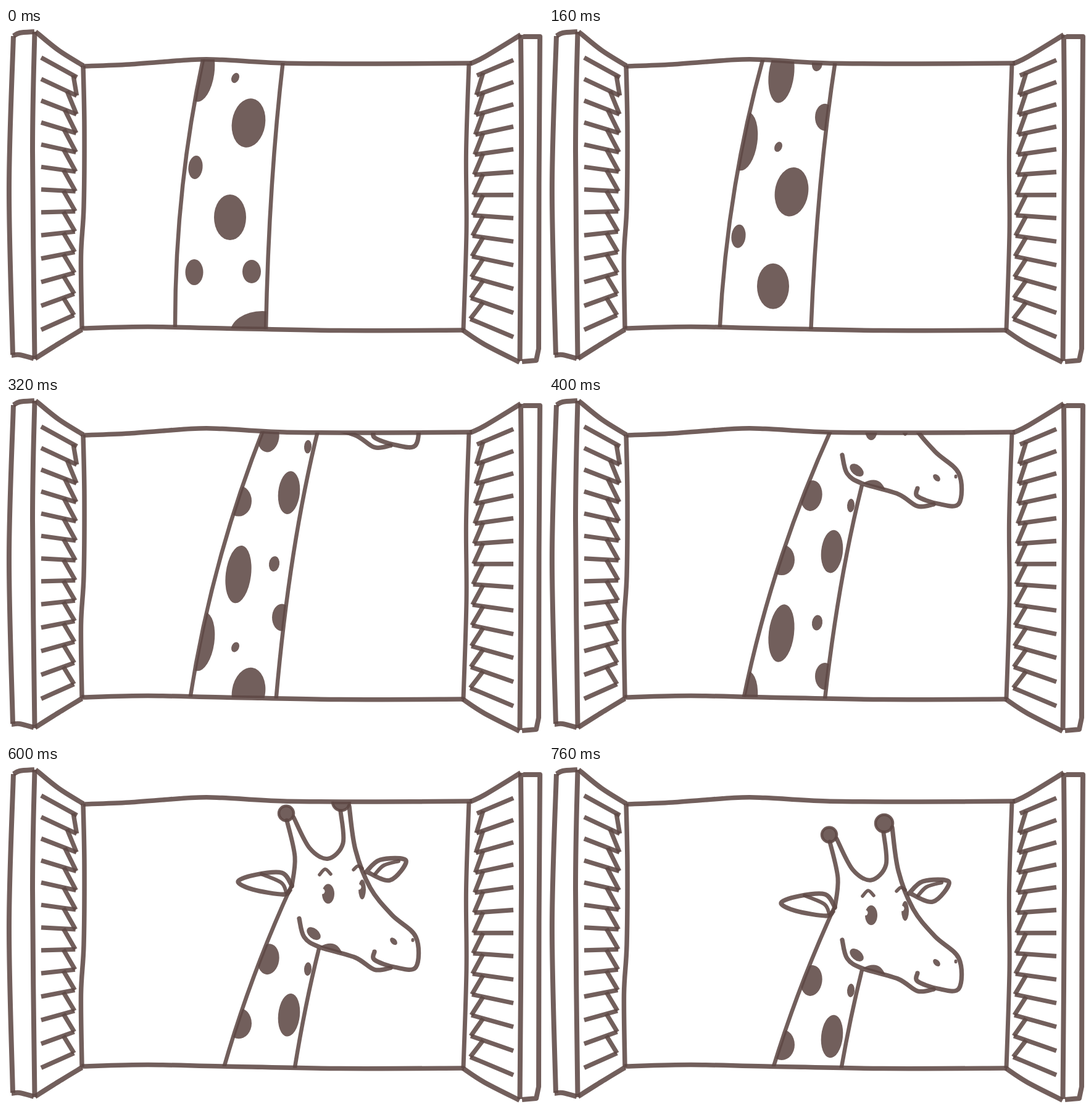
An HTML page that plays this animation: 870x553 px, repeating every 1720 ms.

```html
<!DOCTYPE html>
<html lang="en">
<head>
<meta charset="utf-8">
<title>Giraffe at the window</title>
<style>
html, body { margin: 0; width: 100%; height: 100%; overflow: hidden; background: #fff; }
svg { display: block; width: 100%; height: 100%; }
.line { fill: none; stroke: #5d4844; stroke-opacity: .87; stroke-linejoin: round; }
.spot { fill: #5d4844; fill-opacity: .87; }
.round { stroke-linecap: round; }
</style>
</head>
<body>
<svg viewBox="0 0 870 553">
  <defs>
    <clipPath id="view"><path id="opening"/></clipPath>
    <clipPath id="skin"><path d="M462,230Q272,645 274,1100H421Q430,640 507,331Z"/></clipPath>
  </defs>
  <g clip-path="url(#view)">
    <g id="giraffe">
      <g id="coat" clip-path="url(#skin)"></g>
      <g id="head"></g>
    </g>
  </g>
  <g id="frame"></g>
</svg>
<script>
const LOOP = 1720, MOVE = 760, STEP = 40, TRAVEL = 608;
const byId = id => document.getElementById(id);
const giraffe = byId('giraffe'), coat = byId('coat'), head = byId('head'), frame = byId('frame');

function add(parent, tag, attrs) {
  const el = document.createElementNS('http://www.w3.org/2000/svg', tag);
  for (const key in attrs) el.setAttribute(key, attrs[key]);
  parent.appendChild(el);
  return el;
}

// Smooth curve through a few key points (Catmull-Rom)
function curve(text) {
  const p = text.trim().split(/\s+/).map(s => s.split(',').map(Number));
  const at = i => p[Math.max(0, Math.min(p.length - 1, i))];
  let d = 'M' + p[0];
  for (let i = 0; i < p.length - 1; i++) {
    const [a, b, c, e] = [at(i - 1), at(i), at(i + 1), at(i + 2)];
    const c1 = b.map((v, k) => v + (c[k] - a[k]) / 6);
    const c2 = c.map((v, k) => v - (e[k] - b[k]) / 6);
    d += `C${c1} ${c2} ${c}`;
  }
  return d;
}

const path = (parent, width, d, cap = '') =>
  add(parent, 'path', { class: 'line ' + cap, 'stroke-width': width, d });
const bar = (text, width = 8) => path(frame, width, curve(text));
const ink = (text, width = 7.3) => path(head, width, curve(text), 'round');
const oval = (parent, cx, cy, rx, ry, turn = 0) => add(parent, 'ellipse',
  { class: 'spot', cx, cy, rx, ry, transform: `rotate(${turn} ${cx} ${cy})` });

// Window opening
const lintel = '125,62 200,59 300,51.5 350,51.5 450,57 600,58 755,57';
const sill = '742,490 540,490.5 350,487 230,484.5 122,487';
byId('opening').setAttribute('d', curve(lintel) + curve(sill).replace('M', 'L') + 'Z');
bar(lintel, 7.5);
bar(sill, 7.5);
bar('125,61 127,160 126,290 121.5,370 123,488', 7.5);
bar('750,58 745.5,200 746,330 741,490', 7);

// Left shutter
bar('12,13 5,260 11,530');
bar('12,13 22,8 46,6');
bar('46.5,6 43,200 46.5,537');
bar('9,531 22,530 45,536');
bar('48,6 85,36 125,61');
bar('47,536 85,512 123,489');

// Right shutter
bar('752,58 775,47 834,11');
bar('740,490 775,513 832,542');
bar('834,11 835,200 832.5,540');
path(frame, 8, 'M838,14H865L863.5,250L863,520L859,539L836,541');

// Slats run from an outer edge to an inner edge; a short hook drops to the next one
function slats(outerX, outerY, innerX, innerY, hookX) {
  for (let i = 0; i < 13; i++) {
    const x = innerX(i), y = innerY(i), hx = hookX(i);
    const hy = y + (outerY(i) - y) * (hx - x) / (outerX - x);
    path(frame, 7.3, `M${outerX},${outerY(i)}L${x},${y}`);
    if (i < 12) path(frame, 7.3, `M${hx},${hy}L${innerX(i + 1)},${innerY(i + 1)}`);
  }
}
slats(57, i => 48 + 34.5 * i + .19 * i * i,
  i => 115 - .4 * i, i => 80 + 29.5 * i + .22 * i * i, i => 93 + 16 * Math.exp(-i));
slats(822, i => 52 + 35.5 * i + .16 * i * i,
  i => 763 - .9 * i, i => 77 + 31.7 * i + .1 * i * i, () => 773);

// Neck and its spots, from head to shoulder
path(giraffe, 6.5, 'M462,230Q272,645 274,1100');
path(giraffe, 6.5, 'M507,331Q430,640 421,1100');
oval(coat, 425, 348, 17.5, 25, 8);
oval(coat, 489, 364, 6, 11, 4);
oval(coat, 458.5, 438.5, 17.5, 35, 6);
oval(coat, 377, 452, 21, 25);
oval(coat, 376.5, 571, 20.5, 47, 7);
oval(coat, 434.5, 554, 8.5, 12.5, 8);
oval(coat, 447, 641, 16, 22);
oval(coat, 316, 680, 21.5, 48, 8);
oval(coat, 371.5, 689, 6, 8.5, 25);
oval(coat, 393, 762, 27, 40, 9);
oval(coat, 307, 834, 11.5, 19, 6);
oval(coat, 363, 915, 26, 37);
oval(coat, 305, 1004, 14.5, 21);
oval(coat, 398, 1003, 15, 19);
oval(coat, 415, 1103, 52, 36);

// Horns
function knob(cx, cy, r) {
  oval(head, cx, cy, r, r);
  add(head, 'circle', { class: 'line', cx, cy, r, 'stroke-width': 4.5 });
}
knob(454, 111.5, 12);
knob(543, 93, 14);
ink('455,123 468,182 463,230', 7);
ink('466,118 492,168 522,185 546,160 542,108', 7);

// Face outline, jaw and ears
ink('556,100 566,170 590,232 625,276 664,312 664,361 630,361 597,349 597,336');
ink('475,282 483,312 507,328 565,345 597,365 623,362');
ink('463,229 447,208 405,211 376,222 400,235 449,243 460,236');
ink('414,210 446,224 454,240', 6);
ink('583,207 606,187 648,188 622,220 584,206');
ink('598,210 612,196 636,189', 6);

// Brows, eyes, cheek and nostrils
ink('508,211 517,202 526,210', 5.5);
ink('563,203 570,197 577,201', 5.5);
function eye(cx, cy, rx, ry) {
  oval(head, cx, cy, rx, ry);
  add(head, 'circle', { cx: cx - rx, cy: cy - 4, r: 4.5, fill: '#fff' });
}
eye(522, 242, 10, 16);
eye(577, 235, 6, 16);
oval(head, 498.5, 306.5, 13, 8, 40);
add(head, 'path', { class: 'spot', d: 'M508,328Q535,313 545,339Z' });
oval(head, 628, 319, 7, 4.5, 45);
oval(head, 659, 317, 2.5, 3.2);

// Timing curve cubic-bezier(.26, 0, .474, 1)
function ease(x) {
  let lo = 0, hi = 1, s = .5;
  for (let i = 0; i < 30; i++) {
    s = (lo + hi) / 2;
    const r = 1 - s;
    if (3 * s * r * r * .26 + 3 * s * s * r * .474 + s * s * s < x) lo = s; else hi = s;
  }
  return s * s * (3 - 2 * s);
}

function render(ms) {
  const t = Math.min(MOVE, Math.floor((ms % LOOP) / STEP) * STEP);
  const y = TRAVEL * (ease(t / MOVE) - 1);
  giraffe.setAttribute('transform', `translate(0 ${y.toFixed(2)})`);
}

const start = performance.now();
function tick() {
  render(Math.max(0, performance.now() - start));
  requestAnimationFrame(tick);
}
tick();
</script>
</body>
</html>
```
